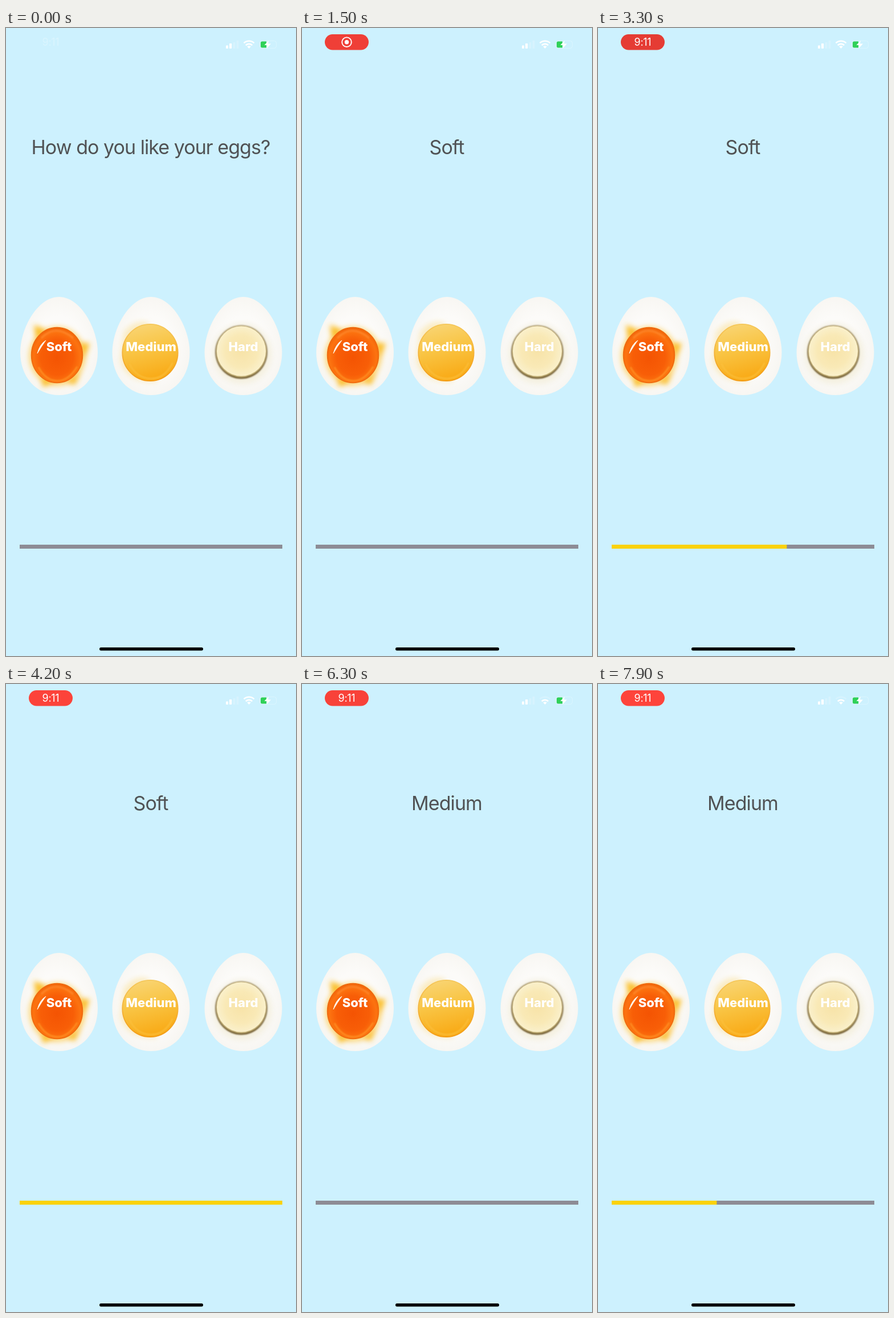
An HTML page that plays this animation: 509 by 1100 pixels, repeating every 8000 ms.

```html
<!DOCTYPE html>
<html lang="en">
<head>
<meta charset="utf-8">
<title>Egg timer</title>
<style>
  html, body { margin: 0; height: 100%; overflow: hidden; background: #cdf1fe; }
  svg { display: block; width: 100vw; height: 100vh; }
  text { font-family: Inter, "Liberation Sans", sans-serif; text-anchor: middle; fill: #fff; }
  .label { font-size: 22px; font-weight: 800; }
  .clock { font-size: 18px; letter-spacing: -.3px; }
  #title { font-size: 34px; fill: #505254; letter-spacing: -.95px; }
</style>
</head>
<body>
<svg viewBox="0 0 509 1100">
  <defs>
    <path id="shell" d="M0 0C38 0 68 56 68 97C68 140 40 172 0 172S-68 140-68 97C-68 56-38 0 0 0Z"/>
    <clipPath id="inside"><use href="#shell"/></clipPath>
    <radialGradient id="white" cx=".5" cy=".5" r=".6">
      <stop offset=".5" stop-color="#fcfbf9"/><stop offset="1" stop-color="#f6f4ef"/>
    </radialGradient>
    <radialGradient id="soft" cx=".5" cy=".54" r=".53">
      <stop offset="0" stop-color="#f45403"/><stop offset=".6" stop-color="#f85e07"/>
      <stop offset=".86" stop-color="#fc7310"/><stop offset="1" stop-color="#f2660a"/>
    </radialGradient>
    <linearGradient id="medium" x2=".25" y2="1">
      <stop offset="0" stop-color="#f9d77b"/><stop offset=".5" stop-color="#f9c545"/>
      <stop offset="1" stop-color="#f9ac19"/>
    </linearGradient>
    <linearGradient id="mediumRim" x2="0" y2="1">
      <stop offset="0" stop-color="#f5c75a"/><stop offset="1" stop-color="#f39a13"/>
    </linearGradient>
    <radialGradient id="hard" cx=".5" cy=".5" r=".5">
      <stop offset="0" stop-color="#f7e3a8"/><stop offset=".65" stop-color="#f9e9b6"/>
      <stop offset="1" stop-color="#faf0cb"/>
    </radialGradient>
    <linearGradient id="hardRim" x2="0" y2="1">
      <stop offset="0" stop-color="#a79a80"/><stop offset=".6" stop-color="#8a7750"/>
      <stop offset="1" stop-color="#6f5a2c"/>
    </linearGradient>
    <filter id="b1" x="-50%" y="-50%" width="200%" height="200%"><feGaussianBlur stdDeviation="1"/></filter>
    <filter id="b5" x="-50%" y="-50%" width="200%" height="200%"><feGaussianBlur stdDeviation="5"/></filter>
  </defs>
  <rect width="509" height="1100" fill="#cdf1fe"/>

  <text id="title" x="254" y="221"></text>

  <g transform="translate(93 471)">
    <use href="#shell" fill="url(#white)"/>
    <g clip-path="url(#inside)">
      <g filter="url(#b5)">
        <ellipse cx="-3" cy="104" rx="50" ry="52" fill="#fbd982"/>
        <path d="M-44 49L-20 58L-40 80ZM34 80L54 81L44 112ZM-34 136L-28 158L-4 150ZM10 150L28 154L40 130Z" fill="#fbc02c"/>
      </g>
      <ellipse cx="-3.500" cy="102" rx="45" ry="48.500" fill="url(#soft)" stroke="#ee6a10" stroke-width="1.500"/>
      <path d="M-36 123Q-24 146-4 147T32 122" fill="none" stroke="#ff9a2a" stroke-width="3" opacity=".65" filter="url(#b1)"/>
      <path d="M-31 72Q-6 46 25 72" fill="none" stroke="#ff9138" stroke-width="4" opacity=".5" filter="url(#b1)"/>
      <path d="M-38 99Q-34 83-23 76Q-31 87-38 99Z" fill="#fff" stroke="#fff1d8" stroke-width="1"/>
    </g>
    <text class="label" x="0" y="95">Soft</text>
  </g>

  <g transform="translate(254.500 471)">
    <use href="#shell" fill="url(#white)"/>
    <g clip-path="url(#inside)">
      <path d="M-48 62Q-30 38-5 45L10 149Q-45 150-54 112Z" fill="#f9e6b0" opacity=".75" filter="url(#b5)"/>
      <ellipse cx="-1.500" cy="97.500" rx="48.700" ry="49.700" fill="url(#medium)" stroke="url(#mediumRim)" stroke-width="1.700"/>
      <path d="M-38 117Q-25 143 0 143T38 115" fill="none" stroke="#fbbf3c" stroke-width="3" opacity=".7" filter="url(#b1)"/>
    </g>
    <text class="label" x="0" y="95">Medium</text>
  </g>

  <g transform="translate(416.500 471)">
    <use href="#shell" fill="url(#white)"/>
    <g clip-path="url(#inside)">
      <ellipse cx="-2" cy="100" rx="52" ry="53" fill="#f3eedb" opacity=".8" filter="url(#b5)"/>
      <ellipse cx="-3.500" cy="96.500" rx="46" ry="47" fill="url(#hardRim)" filter="url(#b1)"/>
      <ellipse cx="-3.500" cy="95.500" rx="44" ry="45" fill="#d9c78d" filter="url(#b1)"/>
      <ellipse cx="-3.500" cy="95" rx="43" ry="43.500" fill="url(#hard)"/>
    </g>
    <text class="label" x="0" y="95">Hard</text>
  </g>

  <rect x="24" y="905" width="461" height="7" fill="#8d8c95"/>
  <rect id="bar" x="24" y="905" height="7" fill="#fad20a"/>
  <rect x="164" y="1085" width="182" height="5.500" rx="2.700"/>

  <text id="plainClock" class="clock" x="78.500" y="31" opacity=".25">9:11</text>
  <g id="pill">
    <rect id="pillFill" x="40" y="11" width="77" height="27.500" rx="13.700"/>
    <g id="record">
      <circle cx="78.500" cy="24.700" r="8.300" fill="none" stroke="#fff" stroke-width="1.900"/>
      <circle cx="78.500" cy="24.700" r="3.700" fill="#fff"/>
    </g>
    <text id="clock" class="clock" x="78.500" y="31">9:11</text>
  </g>

  <g fill="#fff">
    <rect x="386" y="30.500" width="4" height="5.500" rx="1"/>
    <rect x="392" y="27" width="4.200" height="9" rx="1"/>
    <path d="M398.500 25h4v11h-4ZM404.500 22h4v14h-4Z" opacity=".2"/>
    <path d="M426.500 36l-3.300-3.400a5 5 0 0 1 6.600 0Z"/>
  </g>
  <g fill="none" stroke="#fff" stroke-width="2.600">
    <path d="M420.800 30.200a8.200 8.200 0 0 1 11.400 0"/>
    <path id="outerWave" d="M417.500 26.400a13 13 0 0 1 18 0"/>
  </g>
  <rect x="445.500" y="22.500" width="29" height="13" rx="4" fill="none" stroke="#fff" opacity=".25"/>
  <path d="M449.500 23.500H457V34.500H449.500Q447 34.500 447 32V26Q447 23.500 449.500 23.500Z" fill="#30d158"/>
  <path d="M461 22L453.500 30H458.500L457.500 36L465 27.500H460Z" fill="#fff"/>
</svg>
<script>
const LOOP = 8000, BAR_WIDTH = 461;
const PILL_AT = 300, CLOCK_AT = 3000, WEAK_WIFI_AT = 5000;
const timers = [
  { name: "Soft", start: 800, seconds: 3 },
  { name: "Medium", start: 5350, seconds: 5 }
];
const $ = id => document.getElementById(id);
const show = (id, on) => $(id).setAttribute("visibility", on ? "visible" : "hidden");

function draw(t) {
  const timer = timers.findLast(item => t >= item.start);
  const ticks = timer ? Math.floor((t - timer.start) / 1000) : 0;
  const progress = timer ? Math.min(1, ticks / timer.seconds) : 0;
  $("title").textContent = timer ? timer.name : "How do you like your eggs?";
  $("bar").setAttribute("width", BAR_WIDTH * progress);

  const pulse = (1 + Math.cos(t * Math.PI / 1000)) / 2;
  $("pillFill").setAttribute("fill", `rgb(${222 + 33 * pulse},${58 + 10 * pulse},${50 + 9 * pulse})`);
  show("plainClock", t < PILL_AT);
  show("pill", t >= PILL_AT);
  show("record", t >= PILL_AT && t < CLOCK_AT);
  show("clock", t >= CLOCK_AT);
  $("outerWave").setAttribute("opacity", t < WEAK_WIFI_AT ? 1 : .2);
}

function frame() {
  draw(performance.now() % LOOP);
  requestAnimationFrame(frame);
}
frame();
</script>
</body>
</html>
```
